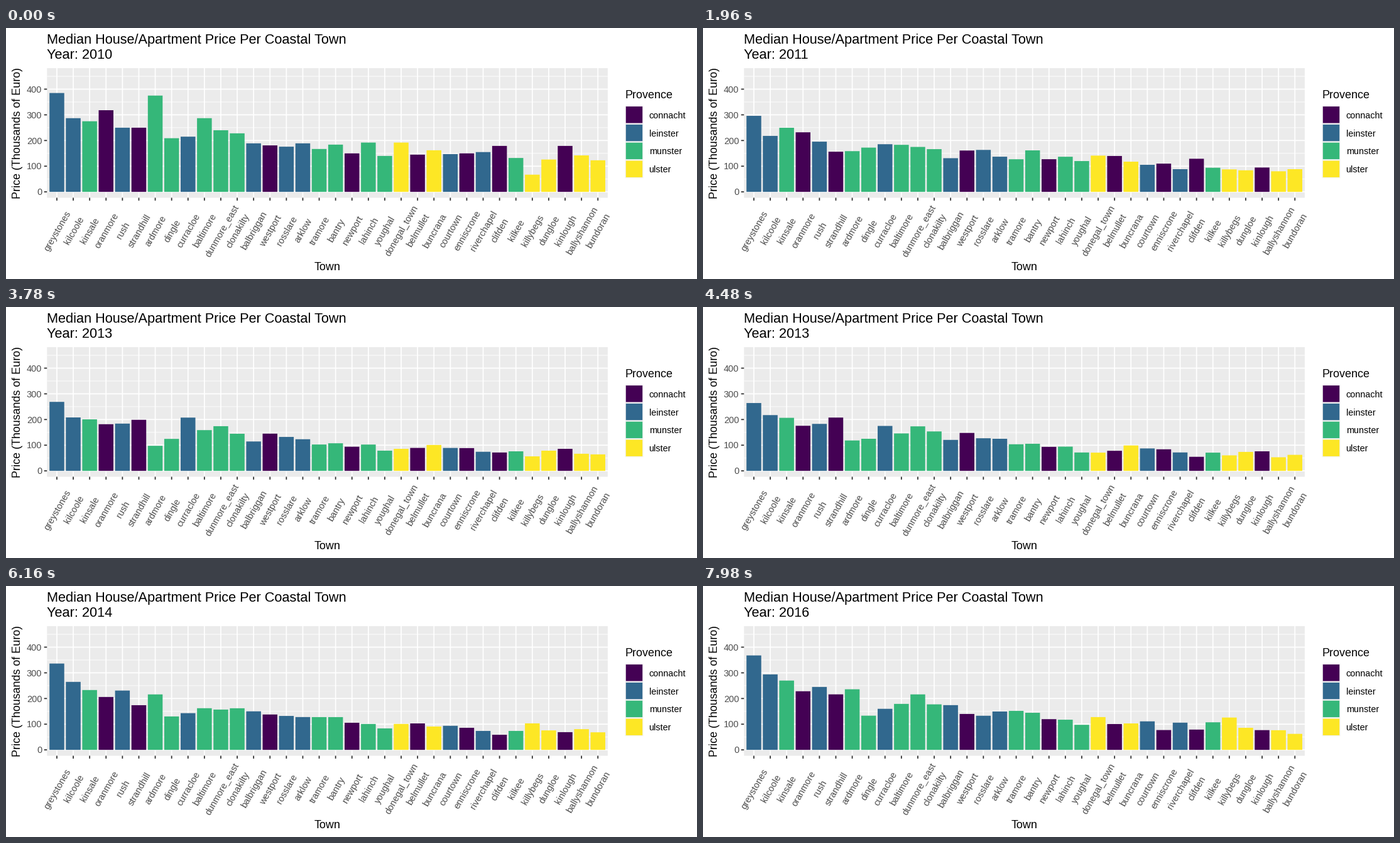
Recreate the animation shown at these times as a matplotlib script. Size 1100 px wide and 400 px high, loop 8 s.

```python
import numpy as np
import matplotlib.pyplot as plt
from matplotlib.animation import FuncAnimation
from matplotlib.collections import LineCollection, PolyCollection
from matplotlib.patches import Rectangle

W, H, DPI = 1100, 400, 100
INTERVAL, LOOP = 40, 8000       # ms
STEP_MS, STEPS_PER_YEAR = 140, 10

# panel geometry in pixels, y downwards
LEFT, RIGHT, TOP, BOTTOM = 65.3, 957.9, 64.0, 270.5
SLOT = (RIGHT - LEFT) / 34.2
X0 = LEFT + 0.6 * SLOT
Y0, UNIT = 261.15, 0.4092
BAR = 0.9 * SLOT
MAJOR, MINOR = 1.78, 0.89

COLORS = {"connacht": "#440154", "leinster": "#31688E",
          "munster": "#35B779", "ulster": "#FDE725"}

TOWNS = """greystones kilcoole kinsale oranmore rush strandhill ardmore dingle
curracloe baltimore dunmore_east clonakilty balbriggan westport rosslare arklow
tramore bantry newport lahinch youghal donegal_town belmullet buncrana courtown
enniscrone riverchapel clifden kilkee killybegs dungloe kinlough ballyshannon
bundoran""".split()

# median price in thousands, one value per year from 2010
connacht = dict(
    oranmore=(318, 252, 202, 173, 186, 236, 225),
    strandhill=(250, 150, 166, 213, 186, 156, 242),
    westport=(181, 181, 131, 151, 135, 142, 139),
    newport=(150, 146, 99, 92, 100, 114, 122),
    belmullet=(145, 151, 123, 75, 91, 121, 92),
    enniscrone=(150, 120, 95, 86, 76, 101, 67),
    clifden=(179, 143, 108, 56, 50, 72, 82),
    kinlough=(179, 84, 111, 75, 81, 51, 88),
)
leinster = dict(
    greystones=(385, 287, 310, 251, 317, 365, 369),
    kilcoole=(287, 226, 206, 209, 250, 287, 297),
    rush=(250, 186, 210, 173, 223, 243, 246),
    curracloe=(215, 136, 260, 185, 135, 155, 162),
    balbriggan=(189, 140, 118, 113, 151, 149, 185),
    rosslare=(176, 173, 149, 125, 135, 128, 135),
    arklow=(189, 149, 119, 125, 125, 132, 157),
    courtown=(147, 111, 97, 86, 93, 95, 118),
    riverchapel=(155, 94, 80, 72, 71, 78, 118),
)
munster = dict(
    kinsale=(275, 286, 195, 203, 221, 251, 278),
    ardmore=(375, 195, 104, 95, 212, 222, 242),
    dingle=(209, 208, 119, 127, 117, 150, 126),
    baltimore=(287, 186, 179, 150, 129, 212, 165),
    dunmore_east=(240, 185, 160, 180, 147, 172, 235),
    clonakilty=(228, 194, 125, 153, 156, 171, 180),
    tramore=(167, 139, 109, 100, 118, 142, 156),
    bantry=(184, 186, 125, 100, 128, 127, 152),
    lahinch=(192, 148, 120, 95, 92, 114, 119),
    youghal=(140, 134, 99, 70, 78, 92, 100),
    kilkee=(132, 98, 88, 71, 71, 78, 120),
)
ulster = dict(
    donegal_town=(192, 152, 125, 69, 79, 134, 125),
    buncrana=(162, 132, 96, 103, 83, 103, 103),
    killybegs=(67, 106, 60, 55, 82, 135, 122),
    dungloe=(126, 82, 87, 75, 69, 86, 86),
    ballyshannon=(142, 57, 115, 46, 81, 80, 75),
    bundoran=(123, 98, 74, 60, 72, 63, 62),
)
GROUPS = dict(connacht=connacht, leinster=leinster,
              munster=munster, ulster=ulster)
PRICE, FILL = {}, {}
for name, group in GROUPS.items():
    PRICE.update(group)
    FILL.update(dict.fromkeys(group, COLORS[name]))
prices = np.array([PRICE[t] for t in TOWNS], float)
xs = X0 + SLOT * np.arange(len(TOWNS))

plt.rcParams["font.family"] = "Liberation Sans"
fig = plt.figure(figsize=(W / DPI, H / DPI), dpi=DPI, facecolor="white")
ax = fig.add_axes([0, 0, 1, 1])
ax.set(xlim=(0, W), ylim=(H, 0))
ax.axis("off")


def y_of(price):
    return Y0 - UNIT * price


def label(x, y, s, px, color="black", **kw):
    opts = dict(ha="left", va="baseline", rotation_mode="anchor")
    opts.update(kw)
    return ax.text(x, y, s, fontsize=px * 72 / DPI, color=color, **opts)


def box(x, y, w, h, color):
    ax.add_patch(Rectangle((x, y), w, h, facecolor=color, lw=0, snap=False))


def lines(segments, px, color, z):
    ax.add_collection(LineCollection(
        segments, linewidths=px * 72 / DPI, colors=color, zorder=z,
        capstyle="butt", snap=False), autolim=False)


def bar_verts(heights):
    verts = np.empty((len(xs), 4, 2))
    verts[:, :2, 0] = (xs - BAR / 2)[:, None]
    verts[:, 2:, 0] = (xs + BAR / 2)[:, None]
    verts[:, [0, 3], 1] = Y0
    verts[:, 1:3, 1] = y_of(heights)[:, None]
    return verts


# panel, grid and ticks
box(LEFT, TOP, RIGHT - LEFT, BOTTOM - TOP, "#EBEBEB")
ticks = range(0, 401, 100)
lines([[(LEFT, y_of(v)), (RIGHT, y_of(v))] for v in range(50, 451, 100)],
      MINOR, "white", 2)
lines([[(LEFT, y_of(v)), (RIGHT, y_of(v))] for v in ticks]
      + [[(x, TOP), (x, BOTTOM)] for x in xs], MAJOR, "white", 2.1)
lines([[(LEFT - 4.6, y_of(v)), (LEFT, y_of(v))] for v in ticks]
      + [[(x, BOTTOM), (x, BOTTOM + 4.6)] for x in xs], MAJOR, "#333333", 2.2)

# axis text
for v in ticks:
    label(57.2, y_of(v) + 5.2, str(v), 14.5, "#4D4D4D", ha="right")
for x, town in zip(xs, TOWNS):
    label(x + 1.2, 323.2, town, 14.5, "#4D4D4D", rotation=60,
          ha="center", va="center")
label((LEFT + RIGHT) / 2, 386, "Town", 18, ha="center")
label(22.6, 167, "Price (Thousands of Euro)", 17.9, rotation=90, ha="center")

# title
label(65, 25, "Median House/Apartment Price Per Coastal Town", 21.8)
year_text = label(65, 49, "Year: 2010", 21.8)

# legend
KEY, LX, LY = 28.8, 985.6, 123.9
label(LX, 111.8, "Provence", 18)
for i, (name, color) in enumerate(COLORS.items()):
    y = LY + KEY * i
    box(LX, y, KEY, KEY, "#F2F2F2")
    box(LX + 1.2, y + 1.2, KEY - 2.4, KEY - 2.4, color)
    label(1023.6, y + KEY / 2 + 5.4, name, 14.4)

bars = PolyCollection(bar_verts(prices[:, 0]), linewidths=0, edgecolors="none",
                      facecolors=[FILL[t] for t in TOWNS], zorder=3,
                      snap=False)
ax.add_collection(bars, autolim=False)


def update(frame):
    step = (frame * INTERVAL + INTERVAL // 2) // STEP_MS
    year, part = divmod(step, STEPS_PER_YEAR)
    t = part / STEPS_PER_YEAR
    bars.set_verts(bar_verts(prices[:, year] * (1 - t) + prices[:, year + 1] * t))
    year_text.set_text(f"Year: {2010 + (step + 5) // STEPS_PER_YEAR}")
    return bars, year_text


def init():
    return update(0)


anim = FuncAnimation(fig, update, frames=LOOP // INTERVAL, init_func=init,
                     interval=INTERVAL, repeat=True, repeat_delay=0)
plt.show()
```
